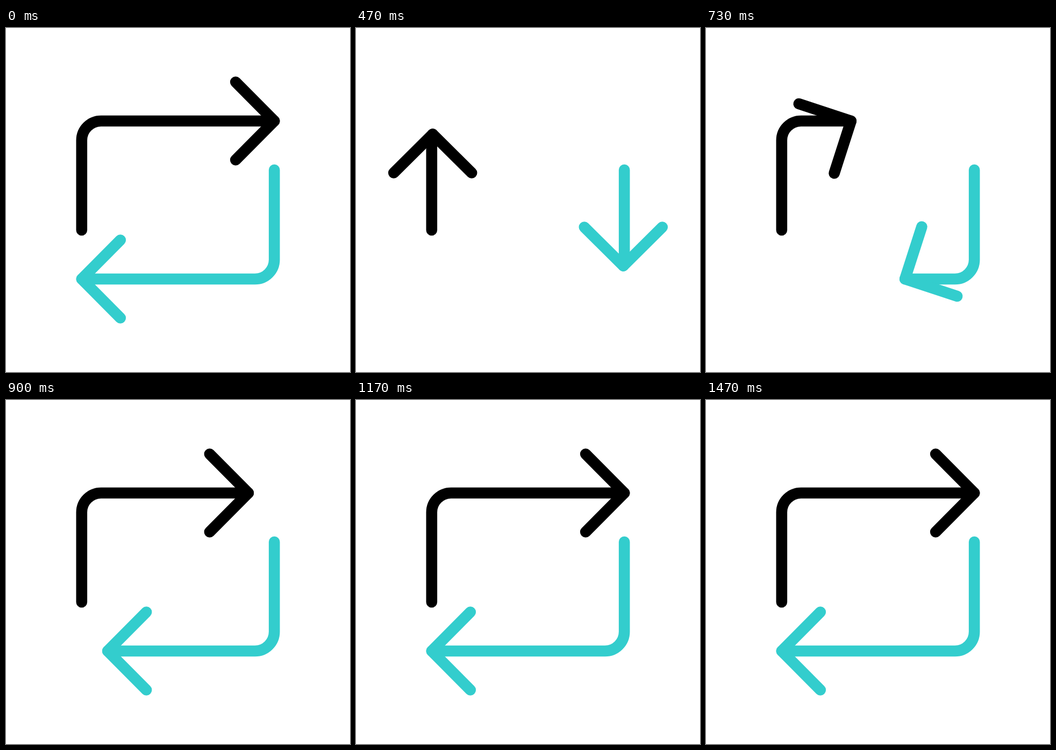
An HTML page with a canvas for the animation above (2 s loop, 640x640 px).

```html
<!DOCTYPE html>
<html lang="en">
<head>
<meta charset="utf-8">
<title>Repeat arrows</title>
<style>
  html, body { margin: 0; width: 100%; height: 100%; overflow: hidden; background: #fff; }
  canvas { display: block; width: 640px; height: 640px; }
</style>
</head>
<body>
<canvas id="stage" width="640" height="640"></canvas>
<script>
const ctx = document.getElementById('stage').getContext('2d');
const LOOP = 2000;
const LEFT = 140.8, RIGHT = 499.2, TOP = 173, BOTTOM = 376, RADIUS = 36;
const ARM = 72.5;
const ARC = RADIUS * Math.PI / 2;
const FULL = ARC + RIGHT - LEFT - RADIUS; // travel beyond the upright part
const TRAVEL = 371;

// Eased progress between two ticks (30 ticks per second)
function ease(tick, from, to) {
  const u = Math.min(1, Math.max(0, (tick - from) / (to - from)));
  return u * u * (3 - 2 * u);
}

function drawArrow(color, reach, turn) {
  const cx = LEFT + RADIUS, cy = TOP + RADIUS;
  const bend = Math.min(reach, ARC) / RADIUS;
  const tipX = cx - RADIUS * Math.cos(bend) + Math.max(0, reach - ARC);
  const tipY = cy - RADIUS * Math.sin(bend);

  ctx.strokeStyle = color;
  ctx.beginPath();
  ctx.moveTo(LEFT, BOTTOM);
  ctx.lineTo(LEFT, cy);
  ctx.arc(cx, cy, RADIUS, Math.PI, Math.PI + bend);
  ctx.lineTo(tipX, tipY);
  ctx.stroke();

  ctx.save();
  ctx.translate(tipX, tipY);
  ctx.rotate(turn);
  ctx.beginPath();
  ctx.moveTo(-ARM + 0.5, -ARM);
  ctx.lineTo(0, 0);
  ctx.lineTo(-ARM + 0.5, ARM);
  ctx.stroke();
  ctx.restore();
}

function draw(now) {
  const time = Math.floor((now % LOOP) / 10) * 10;
  const tick = Math.floor((time + 4) * 0.03);
  const reach = FULL - TRAVEL * (ease(tick, 1.3, 14.8) - ease(tick, 16.05, 30.2));
  const turn = -Math.PI / 2 * (ease(tick, 11.4, 14) - ease(tick, 17, 24.85));

  ctx.fillStyle = '#fff';
  ctx.fillRect(0, 0, 640, 640);
  ctx.lineWidth = 20.6;
  ctx.lineCap = ctx.lineJoin = 'round';
  drawArrow('#000', reach, turn);
  ctx.save();
  ctx.translate(640, 640);
  ctx.rotate(Math.PI);
  drawArrow('#33cdcd', reach, turn);
  ctx.restore();
}

const start = performance.now();
function loop() {
  draw(performance.now() - start);
  requestAnimationFrame(loop);
}
loop();
</script>
</body>
</html>
```
